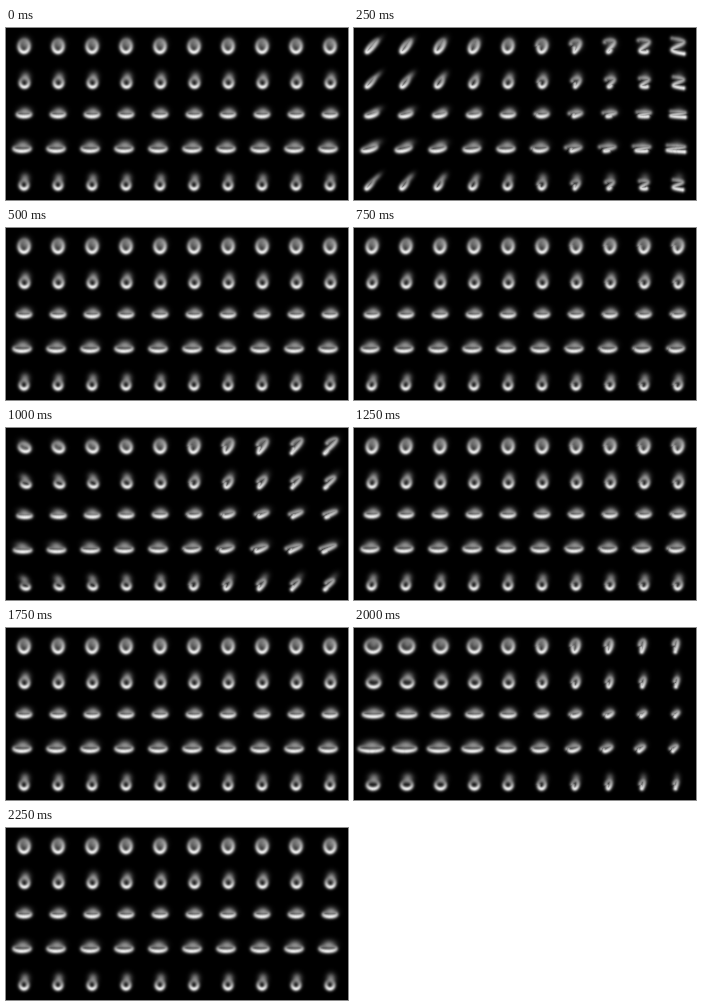
Animation, 342 px wide and 172 px high, one loop 2500 ms. Source, as a matplotlib script:

```python
import numpy as np
import matplotlib.pyplot as plt
from matplotlib.animation import FuncAnimation

W, H, CELL, COLS = 342, 172, 34, 10

# Resting ring of each row: half width, half height, centre x, centre y,
# and how far the haze floats above the centre
ROWS = [
    (5, 6.2, 0, 0, 2.5),
    (4.2, 4.5, .5, 2.5, 5.5),
    (6.5, 2.3, 0, .3, 3),
    (8, 2.6, -2, .6, 4),
    (3.8, 4, 0, 2.8, 6.5),
]

# What each trait does to the ring at the left (-1) and right (+1) column
POSES = {
    ("lean", -1): dict(slant=.75, width=-.45, rise=.15),
    ("lean", 1): dict(curl=1, width=.15, height=.25, glow=.2),
    ("tilt", -1): dict(slant=-.3, height=-.35, drop=1.5),
    ("tilt", 1): dict(slant=.5, rise=.2, curl=.5, height=.3, glow=.2),
    ("width", -1): dict(width=.45, shift=1),
    ("width", 1): dict(width=-.55, rise=.3, curl=.4, shift=-2, glow=.2),
}

# Swept trait and its reach for each step
REST = ("lean", 0)
SLIGHT = ("lean", .1)
STEPS = [REST, ("lean", 1), REST, SLIGHT, ("tilt", 1),
         SLIGHT, ("width", .3), REST, ("width", 1), REST]

GY, GX = np.mgrid[-17:17, -17:17] + .5
S = np.linspace(0, 1, 60)


def glyph(row, trait, amount):
    a, b, cx, cy, lift = ROWS[row]
    u = abs(amount)
    pose = POSES[trait, 1 if amount > 0 else -1]

    def effect(name):
        return u * pose.get(name, 0)

    slant, curl, glow = effect("slant"), effect("curl"), effect("glow")
    a *= 1 + effect("width") * min(1, b / a if trait == "lean" else 1)
    b *= 1 + effect("height")
    cx += effect("shift")
    cy += effect("drop")

    # A closed ring that unrolls into the shape of a 2
    x = -(1 - curl) * np.cos(2 * np.pi * S) - curl * np.cos(3 * np.pi * S)
    y = -(1 - curl) * np.sin(2 * np.pi * S) - curl * np.cos(np.pi * S)
    low = np.clip((1 + y) / 2, 0, 1)
    light = .22 + glow + (.7 - glow) * low
    px = cx + a * x - slant * (b * y + cy)
    py = cy + b * y - effect("rise") * a * x

    px, py, light = (v[:, None, None] for v in (px, py, light))
    ink = (light * np.exp(-((GX - px) ** 2 + (GY - py) ** 2) / 6)).max(axis=0)

    hy = cy - lift
    dx = (GX - cx - 1 + slant * GY) / (2 + .35 * a)
    dy = (GY - hy) / (2.7 + .25 * b)
    haze = (.45 - glow) * np.exp(-(dx ** 2 + dy ** 2) / 2)
    return 1 - (1 - ink) * (1 - haze)


def picture(step):
    trait, reach = STEPS[step]
    canvas = np.zeros((H, W))
    for row in range(len(ROWS)):
        for col in range(COLS):
            amount = reach * (col - 4.5) / 4.5
            top, left = 1 + row * CELL, 1 + col * CELL
            canvas[top:top + CELL, left:left + CELL] = glyph(row, trait, amount)
    return canvas


fig = plt.figure(figsize=(W / 100, H / 100), dpi=100, facecolor="black")
ax = fig.add_axes([0, 0, 1, 1])
ax.axis("off")
image = ax.imshow(picture(0), cmap="gray", vmin=0, vmax=1,
                  interpolation="nearest", aspect="auto")


def update(step):
    image.set_data(picture(step))
    return [image]


anim = FuncAnimation(fig, update, frames=len(STEPS), interval=250,
                     repeat=True, repeat_delay=0)
plt.show()
```
